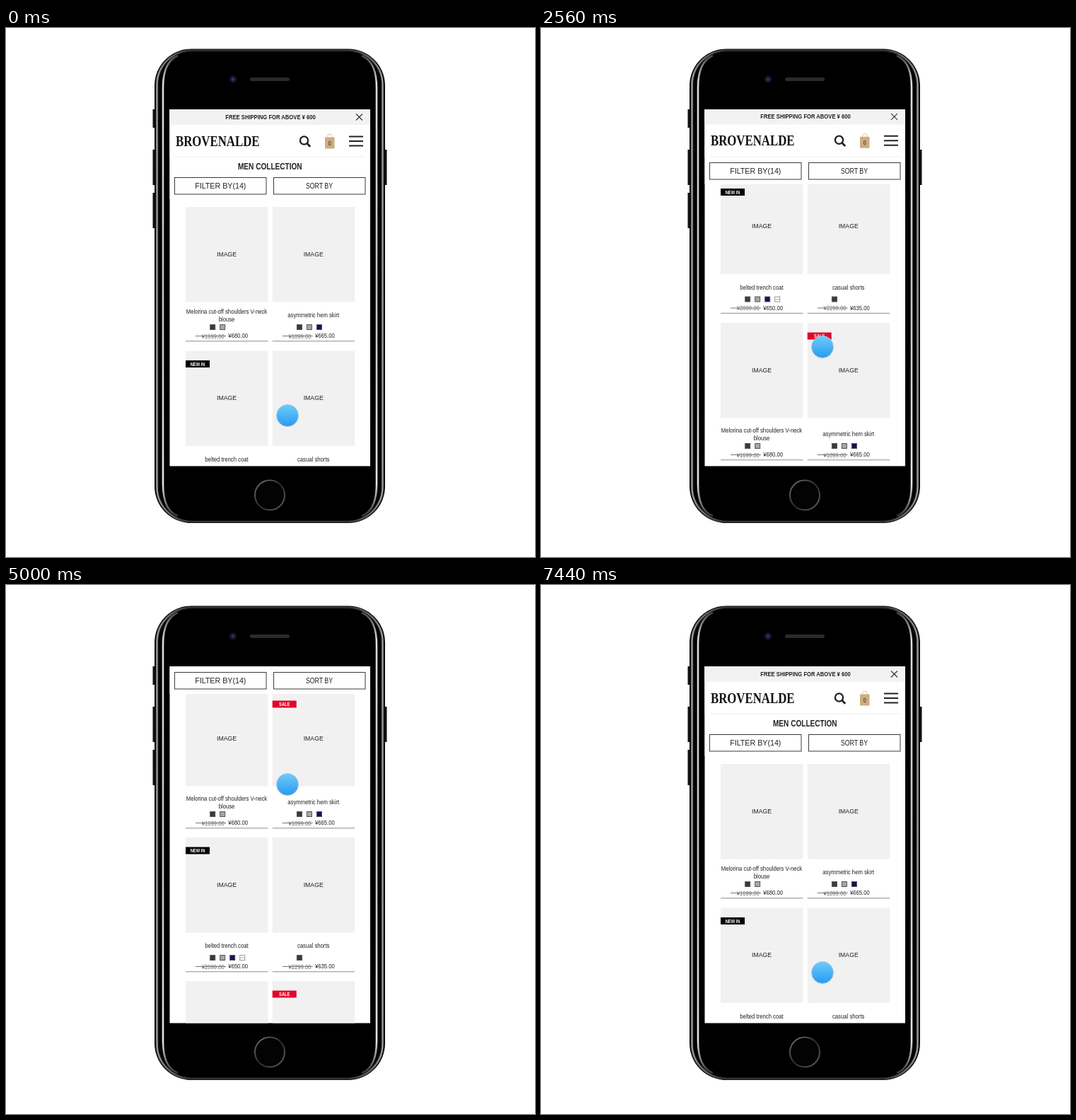
Recreate the animation shown at these times as an HTML page. Size 748 by 748 pixels, loop 7.92 s.

```html
<!DOCTYPE html>
<html lang="en">
<head>
<meta charset="utf-8">
<title>Mobile shop scrolling</title>
<style>
  html, body { margin: 0; width: 100%; height: 100%; overflow: hidden; background: #fff; }
  svg { display: block; width: 100vw; height: 100vh; }
  text { font-family: "Liberation Sans", Arial, sans-serif; fill: #222; }
  .mid { text-anchor: middle; }
  .bold { font-weight: 700; }
  .old { fill: #666; }
  .light { fill: #fff; font-weight: 700; }
  .brand { font-family: "Liberation Serif", Times, serif; font-weight: 700; fill: #111; }
</style>
</head>
<body>
<svg viewBox="0 0 748 748">
  <defs>
    <linearGradient id="rim" x1="0" x2="1" y1="0" y2="0">
      <stop offset="0" stop-color="#999"/><stop offset=".03" stop-color="#777"/>
      <stop offset=".15" stop-color="#333"/><stop offset=".85" stop-color="#333"/>
      <stop offset=".97" stop-color="#777"/><stop offset="1" stop-color="#999"/>
    </linearGradient>
    <linearGradient id="shine" x1="0" x2="0" y1="0" y2="1">
      <stop offset="0" stop-color="#444"/><stop offset=".06" stop-color="#ddd"/>
      <stop offset=".5" stop-color="#c4c4c4"/><stop offset=".93" stop-color="#e4e4e4"/>
      <stop offset="1" stop-color="#333"/>
    </linearGradient>
    <linearGradient id="ring" x1="0" x2="1" y1="0" y2="1">
      <stop offset="0" stop-color="#777"/><stop offset=".5" stop-color="#2c2c2c"/>
      <stop offset="1" stop-color="#666"/>
    </linearGradient>
    <linearGradient id="blue" x1="0" x2="0" y1="0" y2="1">
      <stop offset="0" stop-color="#6ecbfa"/><stop offset="1" stop-color="#279bf2"/>
    </linearGradient>
    <clipPath id="screen"><rect x="231.5" y="115" width="283.5" height="504.5"/></clipPath>
  </defs>

  <g id="phone">
    <path d="M209.5 115V141M209.5 172V222M209.5 233V283M536.5 172V222" stroke="#111" stroke-width="4"/>
    <rect x="210" y="29.5" width="326" height="670.5" rx="52" fill="#0a0a0a"/>
    <rect x="213.5" y="31.5" width="319" height="666.5" rx="49" fill="none" stroke="url(#rim)" stroke-width="2.5"/>
    <rect x="217" y="34" width="312" height="662" rx="46" fill="#000"/>
    <path d="M243 39Q222 48 222 84V645Q222 682 243 690M503 39Q524 48 524 84V645Q524 682 503 690"
      fill="none" stroke="url(#shine)" stroke-width="2.6"/>
    <circle cx="321" cy="72.5" r="5" fill="#15152c"/>
    <circle cx="321" cy="72.5" r="2.2" fill="#30306a"/>
    <rect x="345" y="70" width="56" height="5" rx="2.5" fill="#2b2b2b"/>
    <circle cx="373" cy="660.5" r="21" fill="#030303" stroke="url(#ring)" stroke-width="2"/>
  </g>

  <g clip-path="url(#screen)">
    <rect x="231" y="115" width="285" height="505" fill="#fff"/>
    <g id="list"></g>
    <g id="bar"><rect x="231" y="0" width="285" height="242" fill="#fff"/></g>
    <g id="cover">
      <rect x="231" y="-100" width="285" height="100" fill="#fff"/>
      <path d="M239 0H508" stroke="#ededed"/>
    </g>
    <g id="head">
      <rect x="231" y="105" width="285" height="32" fill="#f2f2f2"/>
      <path d="M495 121.500l9 9m0-9l-9 9" stroke="#333" stroke-width="1.1"/>
      <circle cx="421.500" cy="159" r="5.600" fill="none" stroke="#222" stroke-width="2.300"/>
      <path d="M425.500 163l4.700 4.700" stroke="#222" stroke-width="2.800"/>
      <path d="M454.500 156v-2.500a3.300 3.300 0 0 1 6.600 0v2.500" fill="none" stroke="#d8c3a4"/>
      <rect x="451" y="154.500" width="13.500" height="16" fill="#cdad82"/>
      <path d="M485 153.500h20M485 160h20M485 166.500h20" stroke="#222" stroke-width="2"/>
    </g>
    <circle id="touch" cx="398" cy="0" r="15.500" fill="url(#blue)" stroke="#b4c8d6" stroke-width="1"/>
  </g>
</svg>
<script>
const NS = "http://www.w3.org/2000/svg";
const NARROW = 0.84, STEP = 40, LOOP = 7920;
const $ = id => document.getElementById(id);

function add(parent, tag, attrs, body = "") {
  const el = document.createElementNS(NS, tag);
  for (const k in attrs) el.setAttribute(k, attrs[k]);
  el.textContent = body;
  parent.append(el);
  return el;
}
const box = (parent, x, y, width, height, fill, stroke = "none") =>
  add(parent, "rect", { x, y, width, height, fill, stroke });
const rule = (parent, x, y, w, stroke) => add(parent, "path", { d: `M${x} ${y}h${w}`, stroke });
const label = (parent, body, x, y, size, cls = "mid", sx = NARROW) =>
  add(parent, "text", { transform: `translate(${x} ${y}) scale(${sx} 1)`, "font-size": size, class: cls }, body);

const INK = "#3a3a3a", GREY = "#a6a6a6", NAVY = "#15105a", MORE = "#fff";
const blouse = { lines: ["Melorina cut-off shoulders V-neck", "blouse"], tones: [INK, GREY], was: 1699, now: 680 };
const skirt = { lines: ["asymmetric hem skirt"], tones: [INK, GREY, NAVY], was: 1899, now: 665 };
const coat = { lines: ["belted trench coat"], tones: [INK, GREY, NAVY, MORE], was: 2099, now: 650, badge: "NEW IN" };
const shorts = { lines: ["casual shorts"], tones: [INK], was: 2299, now: 635 };
const saleSkirt = { ...skirt, badge: "SALE" };

// top of the row, extra space under the picture, left and right item
const rows = [
  [253, 0, blouse, skirt],
  [456.5, 0, coat, shorts],
  [660, 4, blouse, saleSkirt],
  [867, 0, coat, shorts],
  [1070, 4, blouse, saleSkirt],
];

function drawItem(item, x, y, gap) {
  const g = add($("list"), "g", { transform: `translate(${x} ${y})` });
  box(g, 0, 0, 116.5, 134.5, "#f1f1f1");
  label(g, "IMAGE", 58, 69.5, 8.7, "mid", 1);
  if (item.badge) {
    box(g, 0, 13.5, 34, 10, item.badge === "SALE" ? "#e2062c" : "#000");
    label(g, item.badge, 17, 21, 6.8, "mid light");
  }
  const two = item.lines.length > 1;
  item.lines.forEach((s, i) => label(g, s, 58, (two ? 151 : 156) + gap + i * 11, 9.2));
  item.tones.forEach((c, i) => {
    const sx = 34.7 + i * 14;
    box(g, sx, 166.5 + gap, 7, 7, c, c === MORE ? "#999" : "#555");
    if (c === MORE) add(g, "path", { d: `M${sx + 1} ${170 + gap}h5`, stroke: "#666", "stroke-dasharray": "1 1" });
  });
  label(g, `¥${item.was}.00`, 22.7, 185.5 + gap, 9.2, "old");
  rule(g, 14, 182.5 + gap, 43, "#777");
  label(g, `¥${item.now}.00`, 60.2, 185 + gap, 9.2, "");
  rule(g, 0, 189.8 + gap, 116.5, "#8c8c8c");
}
for (const [y, gap, left, right] of rows) {
  drawItem(left, 254, y, gap);
  drawItem(right, 376.7, y, gap);
}

const bar = $("bar"), head = $("head");
label(bar, "MEN COLLECTION", 373.3, 200.3, 12, "mid bold");
for (const x of [238.5, 378.5]) box(bar, x, 211.5, 129.5, 23.5, "#fff", "#3a3a3a");
label(bar, "FILTER BY(14)", 303.3, 227, 10.7, "mid", 1);
label(bar, "SORT BY", 443, 227, 10.4);
label(head, "FREE SHIPPING FOR ABOVE ¥ 600", 374, 129, 9.1, "mid bold");
label(head, "BROVENALDE", 240, 166.5, 20, "brand");
label(head, "0", 457.8, 166, 8.5);

// time, list scroll, bar shift, header shift, header bottom, touch y
const keys = [
  [0, 0, 0, 0, 182, 548],
  [1080, 109, -8, 1.5, 174, 505],
  [2560, 243, -21, -0.7, 182, 451],
  [3280, 363, -78, -57, 125, 380],
  [3720, 430, -84, -80, 102, 335],
  [4200, 430, -84, -80, 102, 335],
  [5000, 510, -88, -86, 96, 282],
  [5600, 542, -88, -88, 94, 258],
  [6080, 542, -88, -88, 94, 258],
  [6480, 450, -70, -70, 112, 307],
  [6800, 263, -42, -45, 137, 407],
  [7140, 66, -10, -10, 172, 513],
  [7440, 0, 0, 0, 182, 548],
];

const slope = (i, c) => (keys[i + 1][c] - keys[i][c]) / (keys[i + 1][0] - keys[i][0]);

// tangent that never overshoots the keys
function tangent(i, c) {
  if (i === 0 || i === keys.length - 1) return 0;
  const a = slope(i - 1, c), b = slope(i, c);
  return a * b <= 0 ? 0 : 2 * a * b / (a + b);
}

function at(t, c) {
  const last = keys.length - 1;
  if (t >= keys[last][0]) return keys[last][c];
  const i = keys.findIndex(k => k[0] > t) - 1;
  const h = keys[i + 1][0] - keys[i][0], u = (t - keys[i][0]) / h;
  const s = u * u * (3 - 2 * u);
  return keys[i][c] * (1 - s) + keys[i + 1][c] * s
    + h * u * (1 - u) * ((1 - u) * tangent(i, c) - u * tangent(i + 1, c));
}

const shift = (el, y) => el.setAttribute("transform", `translate(0 ${y.toFixed(2)})`);

function draw(now) {
  const t = Math.floor((now % LOOP) / STEP) * STEP;
  shift($("list"), -at(t, 1));
  shift(bar, at(t, 2));
  shift(head, at(t, 3));
  shift($("cover"), at(t, 4));
  shift($("touch"), at(t, 5));
}

const start = performance.now();
function tick() {
  draw(performance.now() - start);
  requestAnimationFrame(tick);
}
tick();
</script>
</body>
</html>
```
